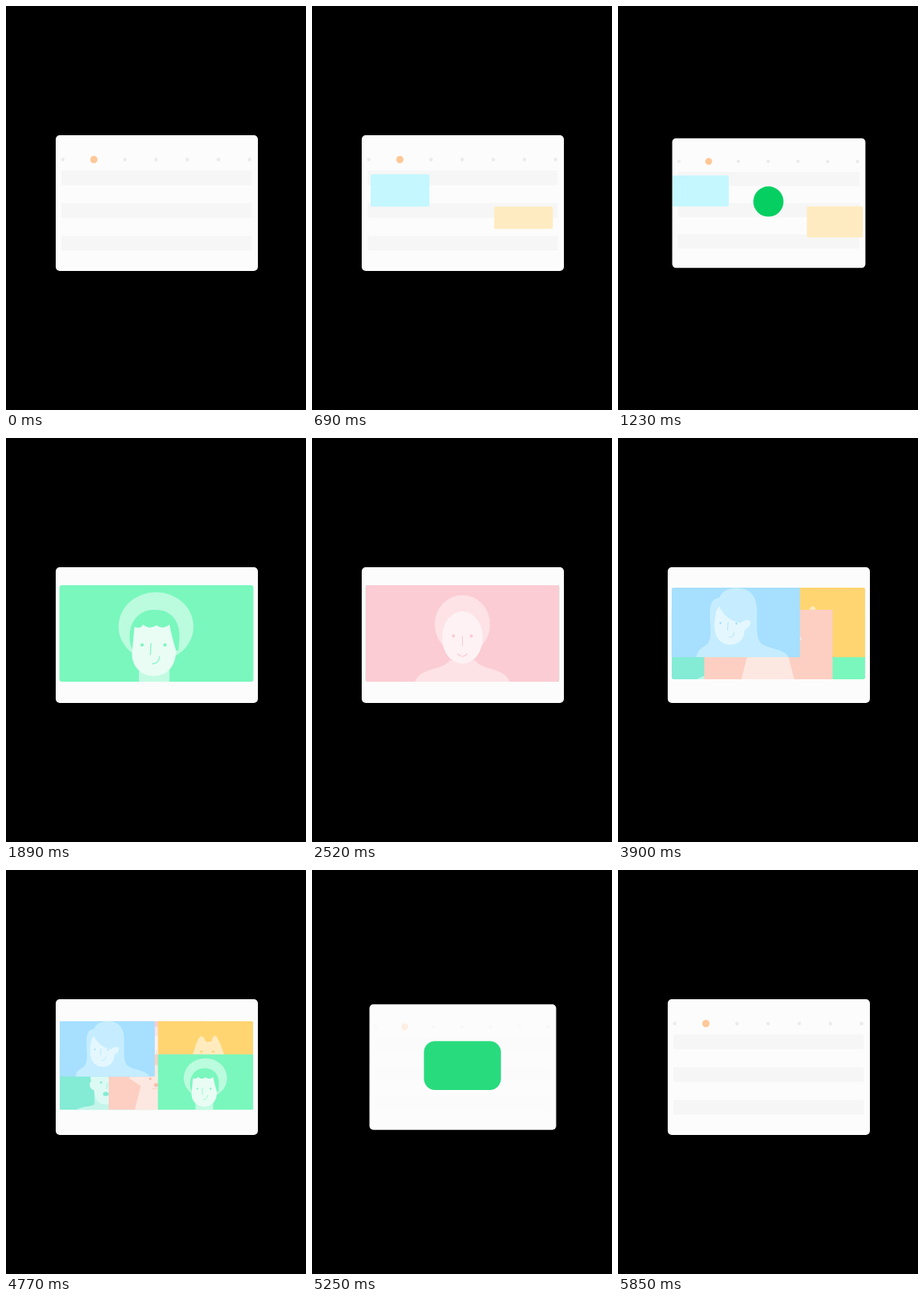
An HTML page with a canvas for the animation above (6000 ms loop, 368 by 494 pixels).

```html
<!DOCTYPE html>
<html lang="en">
<head>
<meta charset="utf-8">
<title>Calendar to video call</title>
<style>
  html, body { margin: 0; width: 100%; height: 100%; overflow: hidden; background: #000; }
  canvas { display: block; }
</style>
</head>
<body>
<canvas id="stage"></canvas>
<script>
const W = 368, H = 494, LOOP = 6000, STEP = 30;
const CX = 184.5, CY = 239;          // panel centre
const KX = 184.8, KY = 240.8;        // card centre
const PANEL = { w: 238, h: 118 };

const canvas = document.getElementById('stage');
const ctx = canvas.getContext('2d');
const ratio = window.devicePixelRatio || 1;
canvas.width = W * ratio;
canvas.height = H * ratio;
canvas.style.width = W + 'px';
canvas.style.height = H + 'px';

const clamp = x => Math.min(1, Math.max(0, x));
const lerp = (a, b, k) => a + (b - a) * k;
const sine = k => (1 - Math.cos(Math.PI * k)) / 2;
const cubic = k => k < .5 ? 4 * k ** 3 : 1 - (2 - 2 * k) ** 3 / 2;
const span = (t, a, b, ease = sine) => ease(clamp((t - a) / (b - a)));
const mix = (a, b, k) => `rgb(${a.map((v, i) => Math.round(lerp(v, b[i], k)))})`;

function roundBox(x, y, w, h, r) {
  ctx.beginPath();
  ctx.roundRect(x, y, w, h, Math.min(r, w / 2, h / 2));
}
function box(x, y, w, h, r, fill) {
  if (w <= 0 || h <= 0) return;
  roundBox(x, y, w, h, r);
  ctx.fillStyle = fill;
  ctx.fill();
}
function oval(x, y, rx, ry, fill, turn = 0) {
  ctx.beginPath();
  ctx.ellipse(x, y, rx, ry, turn, 0, 7);
  ctx.fillStyle = fill;
  ctx.fill();
}
function shape(d, fill) {
  ctx.fillStyle = fill;
  ctx.fill(new Path2D(d));
}
function line(d, color, width = 1.1) {
  ctx.strokeStyle = color;
  ctx.lineWidth = width;
  ctx.lineCap = 'round';
  ctx.stroke(new Path2D(d));
}

// Figures are drawn from the bottom centre of a tile 118 units high.
const people = {
  green: {
    bg: '#79f7bd',
    draw(bg) {
      oval(-.5, -67.5, 46, 42, '#bbfbde');
      shape('M-32 -46C-36 -70 -24 -88 -2 -88C20 -88 30 -72 28 -50L27 -38L-30 -40Z', bg);
      shape('M-21.5 -26H16V0H-21.5Z', '#c3fbe2');
      shape('M-27 -67Q-20 -64 -16 -70Q-9 -63 0 -69Q8 -63 16 -70L19 -56L24 -38C24 -18 12 -7 -3 -7C-20 -7 -30 -20 -30 -34Z', '#e9fdf5');
      oval(-17.5, -45, 2, 2, bg);
      oval(10.5, -45, 2, 2, bg);
      line('M-6.5 -47L-7.5 -33M-5 -22Q3 -22 4 -31', bg);
    }
  },
  teal: {
    bg: '#84ebd5',
    draw(bg) {
      shape('M-66 0C-52 -9 -34 -6 -27 -12V-34L22 -32V-12C30 -6 52 -9 62 0Z', '#c4f5ea');
      shape('M-37 -80C-32 -104 26 -104 28 -76V-46C28 -24 14 -12 -4 -12C-20 -12 -27 -24 -28 -42C-38 -44 -40 -58 -34 -60Z', '#dcfaf3');
      oval(-13, -58, 2.4, 2.4, bg);
      oval(12, -58, 2.4, 2.4, bg);
      oval(-3, -34, 6, 4.5, bg);
      line('M0 -56L-1 -45', bg);
    }
  },
  rose: {
    bg: '#fbccd3',
    draw(bg) {
      shape('M-58 0C-52 -18 -22 -14 -16 -26H16C22 -14 52 -18 58 0Z', '#fde2e6');
      oval(0, -70, 34, 36, '#fde2e6');
      oval(0, -54, 25, 32, '#fef2f4');
      oval(-11, -56, 2, 2, bg);
      oval(11, -56, 2, 2, bg);
      line('M0 -56V-44M-6 -34Q0 -28 6 -34', bg);
    }
  },
  yellow: {
    bg: '#ffd572',
    draw(bg) {
      shape('M-42 0L-27 -48L-20 -70Q-12 -91 -5 -84L1 -74H12Q16 -91 23 -85L31 -70L39 -48L50 0Z', '#ffebbd');
      oval(-9, -53, 2.6, 2.6, bg);
      oval(16, -53, 2.6, 2.6, bg);
      oval(3.5, -42, 4, 3, bg);
      line('M-5 -36Q0 -31 3.5 -36Q8 -31 13 -36', bg);
    }
  },
  pink: {
    bg: '#fccfc2',
    draw() {
      const ink = '#f9bfae';
      shape('M-46 0L-33 -51L-58 -67C-50 -82 -42 -95 -28 -95C-22 -95 -19 -93 -18 -92C-8 -96 8 -96 15 -92C20 -94 24 -94 28 -93C42 -91 50 -80 57 -68L31 -50L44 0Z', '#fde8e1');
      oval(13.5, -68, 11, 12.3, '#fef5f2', -.3);
      oval(-13, -66, 2.8, 2.8, ink);
      oval(11, -66, 2.8, 2.8, ink);
      oval(-.5, -53, 5, 4, ink);
      line('M-10 -47Q-6 -41 -.5 -47Q6 -41 11 -47', ink);
    }
  },
  blue: {
    bg: '#a6dfff',
    draw(bg) {
      shape('M-67 0C-66 -14 -56 -16 -48 -23C-40 -32 -44 -50 -44 -75C-44 -96 -36 -100 -28 -101C-22 -116 -6 -118 6 -117C28 -115 36 -100 36 -78C36 -50 34 -32 44 -23C56 -14 84 -14 90 0Z', '#c5edff');
      shape('M-28 -86C-22 -72 -8 -60 8 -58C14 -64 26 -66 25 -58C24 -50 16 -48 15 -46C15 -30 4 -21 -9 -21C-26 -21 -36 -34 -36 -52C-36 -66 -34 -82 -28 -86Z', '#e4f7ff');
      oval(-26, -58, 1.8, 1.8, bg);
      oval(1, -57, 1.8, 1.8, bg);
      line('M-13 -59L-14 -46M-11 -34Q-3 -34 -3 -42', bg);
    }
  }
};

function tile(name, x, y, w, h, alpha = 1, figure = 1) {
  const p = people[name];
  ctx.save();
  ctx.globalAlpha *= alpha;
  ctx.beginPath();
  ctx.rect(x, y, w, h);
  ctx.clip();
  ctx.fillStyle = p.bg;
  ctx.fillRect(x, y, w, h);
  ctx.globalAlpha *= figure;
  ctx.translate(x + w / 2, y + h);
  ctx.scale(h / PANEL.h, h / PANEL.h);
  p.draw(p.bg);
  ctx.restore();
}

// Each entry: start time, then horizontal and vertical scale of the card.
const bounce = [[0, 1, 1], [280, .9, .9], [620, 1.052, 1.018], [780, 1, 1]];
function cardScale(t) {
  const u = t - (t < 3000 ? 1100 : 5060);
  for (let i = 1; i < bounce.length; i++) {
    const a = bounce[i - 1], b = bounce[i];
    if (u < b[0]) {
      const k = span(u, a[0], b[0]);
      return [lerp(a[1], b[1], k), lerp(a[2], b[2], k)];
    }
  }
  return [1, 1];
}

function calendar(t) {
  const alpha = 1 - span(t, 1400, 1650) + span(t, 5150, 5450);
  if (alpha <= 0) return;
  ctx.save();
  ctx.globalAlpha = alpha;
  for (let i = 0; i < 3; i++) box(68, 201 + 40 * i, 233.5, 18, 0, '#f6f6f6');
  for (let i = 0; i < 7; i++) {
    const on = i === 1;
    oval(69.6 + 38.2 * i, 187.7, on ? 4.5 : 2.2, on ? 4.5 : 2.2, on ? '#ffc898' : '#ebebeb');
  }
  if (t < 3000) {
    const push = 10.4 * span(t, 1050, 1230);
    const fade = 1 - span(t, 1300, 1550);
    ctx.globalAlpha *= fade;
    box(72 - push, 205.7, 72, 39.6 * span(t, 30, 460), 1.5, '#c4f7ff');
    box(223.4 + push, 245.3, 72, 39.6 * span(t, 460, 830), 1.5, '#ffebc1');
  }
  ctx.restore();
}

// Circle that opens into the panel, and closes again near the end.
function bubble(t) {
  const late = t > 3000;
  const open = late ? 1 - span(t, 5060, 5360) : span(t, 1280, 1640);
  const r = 18.5 * (late ? 1 - span(t, 5330, 5500) : span(t, 830, 1200));
  if (r <= 0) return;
  const w = lerp(2 * r, PANEL.w, open), h = lerp(2 * r, PANEL.h, open);
  const x = CX - w / 2, y = CY - h / 2;
  const round = lerp(r, 3, open);
  box(x, y, w, h, round, mix([6, 207, 98], [121, 247, 189], open));
  const figure = late ? 1 - span(t, 5060, 5200) : span(t, 1500, 1740);
  if (figure > 0) {
    ctx.save();
    roundBox(x, y, w, h, round);
    ctx.clip();
    ctx.translate(CX, y + h);
    ctx.scale(h / PANEL.h, h / PANEL.h);
    ctx.globalAlpha = figure;
    people.green.draw(people.green.bg);
    ctx.restore();
  }
}

// Column, row and time each speaker comes up, in stacking order.
const speakers = [
  ['green', 2, 1, 1700], ['teal', 0, 1, 1930], ['rose', 1, 0, 2260],
  ['yellow', 2, 0, 2600], ['pink', 1, 1, 2940], ['blue', 0, 0, 3340]
];

function call(t) {
  const p = span(t, 3740, 4060, cubic) - span(t, 4628, 4988, cubic);
  const w = PANEL.w - 160 * p, h = PANEL.h - 66 * p;
  const left = CX - PANEL.w / 2, top = 180 + 6 * p, tall = PANEL.h - 12 * p;
  ctx.save();
  roundBox(left, top, PANEL.w, tall, 3);
  ctx.clip();
  const order = speakers.slice();
  if (t >= 4300) order.push(order.shift());
  for (const [name, col, row, start] of order) {
    const x = left + (PANEL.w - w) * col / 2;
    const y = top + (tall - h) * row;
    const alpha = span(t, start, start + 160);
    if (alpha > 0) tile(name, x, y, w, h, alpha);
  }
  ctx.restore();
}

function draw(t) {
  ctx.setTransform(ratio, 0, 0, ratio, 0, 0);
  ctx.fillStyle = '#000';
  ctx.fillRect(0, 0, W, H);
  const [sx, sy] = cardScale(t);
  ctx.save();
  ctx.translate(KX, KY);
  ctx.scale(sx, sy);
  ctx.translate(-KX, -KY);
  box(61, 158, 248, 166, 5, '#fcfcfc');
  calendar(t);
  if (t < 1900 || t >= 5060) {
    // the circle keeps its own size until it opens
    const k = t < 3000 ? span(t, 1280, 1640) : 1 - span(t, 5060, 5360);
    ctx.translate(CX, CY);
    ctx.scale(lerp(1 / sx, 1, k), lerp(1 / sy, 1, k));
    ctx.translate(-CX, -CY);
    bubble(t);
  } else {
    call(t);
  }
  ctx.restore();
}

const begin = performance.now();
function tick() {
  const t = (performance.now() - begin) % LOOP;
  draw(Math.floor(t / STEP) * STEP);
  requestAnimationFrame(tick);
}
draw(0);
requestAnimationFrame(tick);
</script>
</body>
</html>
```
